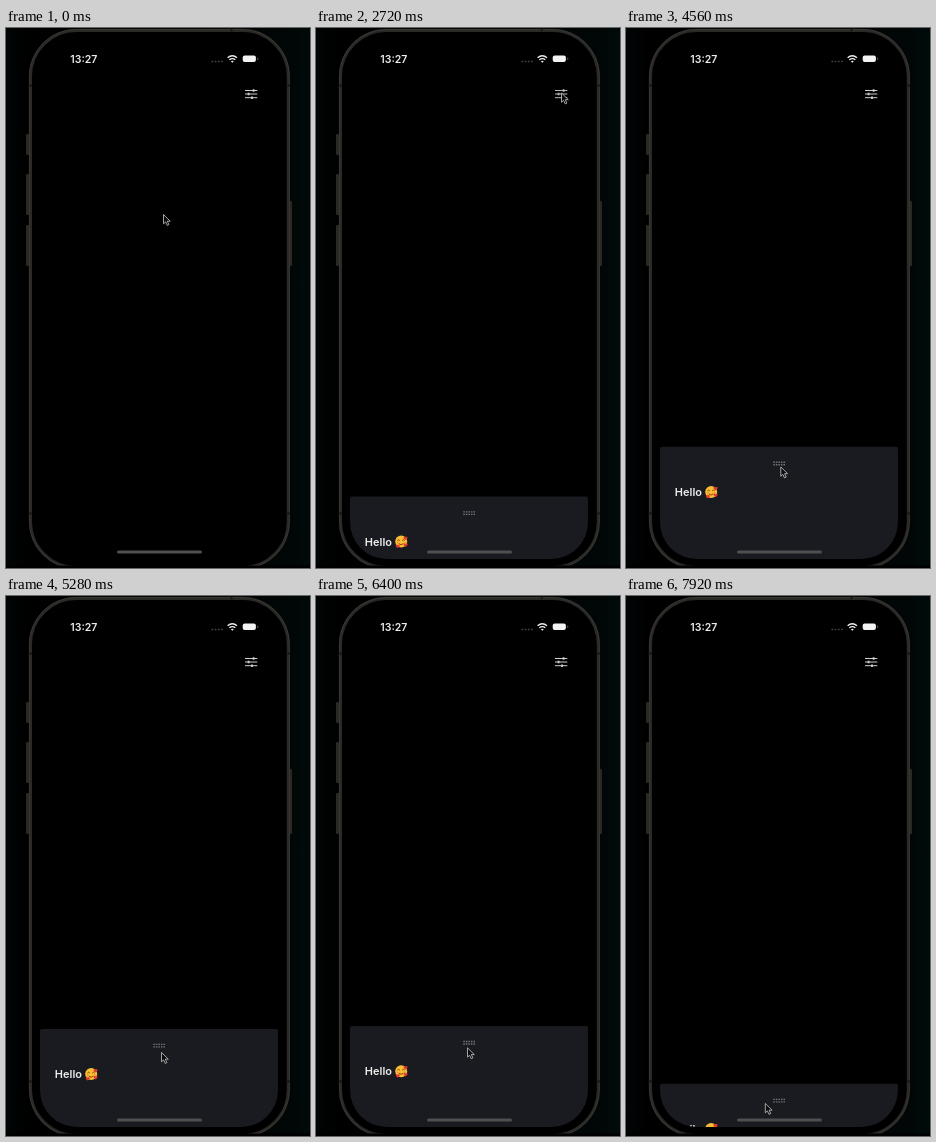
Animation of 304x540 px, one loop 8 s. Source, as an HTML page:

```html
<!DOCTYPE html>
<html lang="en">
<head>
<meta charset="utf-8">
<title>Bottom sheet</title>
<style>
  html, body { margin: 0; width: 100%; height: 100%; overflow: hidden; background: #000; }
  svg { display: block; width: 100vw; height: 100vh; }
  text { font-family: Inter, Roboto, sans-serif; font-weight: 600; fill: #ececec; }
</style>
</head>
<body>
<svg viewBox="0 0 304 540">
  <defs>
    <clipPath id="screen"><rect x="34" y="12" width="238" height="519" rx="37"/></clipPath>
    <linearGradient id="glow">
      <stop offset="0" stop-color="#010505"/><stop offset=".07" stop-color="#000"/>
      <stop offset=".93" stop-color="#010606"/><stop offset="1" stop-color="#010b0b"/>
    </linearGradient>
    <path id="heart" d="M0 2.1C-3.4-.3-1.9-2.3 0-.9 1.9-2.3 3.4-.3 0 2.1z" fill="#e23a2c"/>
  </defs>
  <rect width="304" height="540" fill="url(#glow)"/>

  <!-- phone body -->
  <g fill="#292825">
    <rect x="20" y="106" width="3" height="21" rx="1"/>
    <rect x="20" y="146" width="3" height="41" rx="1"/>
    <rect x="20" y="197" width="3" height="41" rx="1"/>
    <rect x="283" y="173" width="3" height="65" rx="1"/>
  </g>
  <rect x="24.5" y="2.5" width="257.8" height="537" rx="46" stroke="#2a2926" stroke-width="3"/>
  <rect x="23.4" y="1.4" width="260" height="539.2" rx="47" fill="none" stroke="#3d3c38" stroke-width=".8"/>
  <path d="M22.5 57.5h3.5M22.5 485.5h3.5M280.5 57.5h3.5M280.5 485.5h3.5M225.5 .5v3" stroke="#181816" stroke-width="2"/>
  <rect y="537.5" width="304" height="3"/>

  <!-- status bar -->
  <text x="64.3" y="34.5" font-size="10.5">13:27</text>
  <path d="M205.5 33.5h11.5" stroke="#444" stroke-width="1.6" stroke-dasharray="1.7 1.5"/>
  <g fill="none" stroke="#eee" stroke-width="1.4">
    <path d="M221.6 29.7q4.7-4 9.4 0M223.3 31.8q3-2.4 6 0"/>
    <path d="M224.8 33.2q1.5-1.1 3 0l-1.5 1.6z" fill="#eee" stroke="none"/>
  </g>
  <rect x="236.7" y="27.5" width="13.2" height="6.6" rx="2" fill="#f4f4f4"/>
  <path d="M251.7 29.6v2.4" stroke="#555"/>

  <g id="icon" stroke="#cfcfcf" fill="#cfcfcf">
    <path d="M239 62.5h12.3M239 66h12.3M239 69.7h12.3"/>
    <path d="M247.6 61.3v2.4M242.6 64.8v2.4M246 68.5v2.4" stroke-width="1.8"/>
  </g>

  <g clip-path="url(#screen)">
    <g id="sheet">
      <rect x="34" width="238" height="200" rx="2" fill="#1a1b20"/>
      <path d="M147.3 15.5h12M147.3 18h12" stroke="#737478" stroke-width="1.4" stroke-dasharray="1.5 1.05"/>
      <text x="48.8" y="49.3" font-size="11">Hello</text>
      <g transform="translate(85.2 45.2)">
        <circle r="6" fill="#fbbd34"/>
        <path d="M-3.8-1q1.2-1.8 2.4 0M1-1q1.2-1.8 2.4 0M-2.3 2q2.2 2.3 4.4 0" fill="none" stroke="#6b3a12" stroke-width=".9"/>
        <path d="M-4.2 1.2h1.6M2.6 1.2h1.6" stroke="#f08a3c" stroke-width="1.4"/>
        <use href="#heart" x="-3.4" y="4.4"/>
        <use href="#heart" x="4.3" y="-3.6"/>
        <use href="#heart" x="4.4" y="3.2"/>
      </g>
    </g>
  </g>
  <rect x="111" y="522.5" width="85" height="3" rx="1.5" fill="#4f4f51"/>
  <path id="cursor" d="M0 0v9.3l2.1-1.9 1.6 3.5 1.7-.8-1.6-3.4h3z" fill="#0c0c0c" stroke="#c8c8c8" stroke-width=".8" stroke-linejoin="round"/>
</svg>
<script>
const LOOP = 8000, STEP = 80, REST = 413, CLOSED = 118, OPEN_AT = 2585;

// pointer moves in order; a move with a pull also drags the sheet and lets it go at its end
const home = { x: 157.5, y: 186.5 };
const moves = [
  { from: 0, to: 900, x: 246, y: 80 },
  { from: 900, to: 1400, x: 245.5, y: 65 },
  { from: 3228, to: 3670, x: 62, y: 486 },
  { from: 3670, to: 4320, x: 154.5, y: 432 },
  { from: 4400, to: 5270, x: 155.5, y: 456.5, pull: 20 },
  { from: 5270, to: 6180, x: 152.5, y: 434.5 },
  { from: 6180, to: 6837, x: 150.5, y: 469, pull: 34 },
  { from: 6837, to: 7540, x: 149, y: 432 },
  { from: 7540, to: 7920, x: 139.3, y: 507.5, pull: 75 }
];

// eased share of a move done at time t
function progress(move, t) {
  const u = Math.min(1, Math.max(0, (t - move.from) / (move.to - move.from)));
  return move.pull ? Math.sin(u * Math.PI / 2) : u * u * (3 - 2 * u);
}

// damped spring: stiffness 100, damping 10, mass 1; stays at 1 until released
function spring(ms) {
  const s = Math.max(0, ms) / 1000, w = Math.sqrt(75);
  return Math.exp(-5 * s) * (Math.cos(w * s) + 5 / w * Math.sin(w * s));
}

const [icon, sheet, cursor] = ["icon", "sheet", "cursor"].map(id => document.getElementById(id));
const place = (el, x, y) => el.setAttribute("transform", `translate(${x} ${y})`);

function draw(now) {
  const t = Math.floor(now % LOOP / STEP) * STEP;
  let { x, y } = home, top = REST + CLOSED * spring(t - OPEN_AT);
  for (const move of moves) {
    const p = progress(move, t);
    x += (move.x - x) * p;
    y += (move.y - y) * p;
    if (move.pull) top += move.pull * p * spring(t - move.to);
  }
  place(cursor, x, y);
  place(sheet, 0, top);
  icon.setAttribute("opacity", t >= 2160 && t < 2800 ? .9 : 1);
  requestAnimationFrame(draw);
}
draw(0);
</script>
</body>
</html>
```
